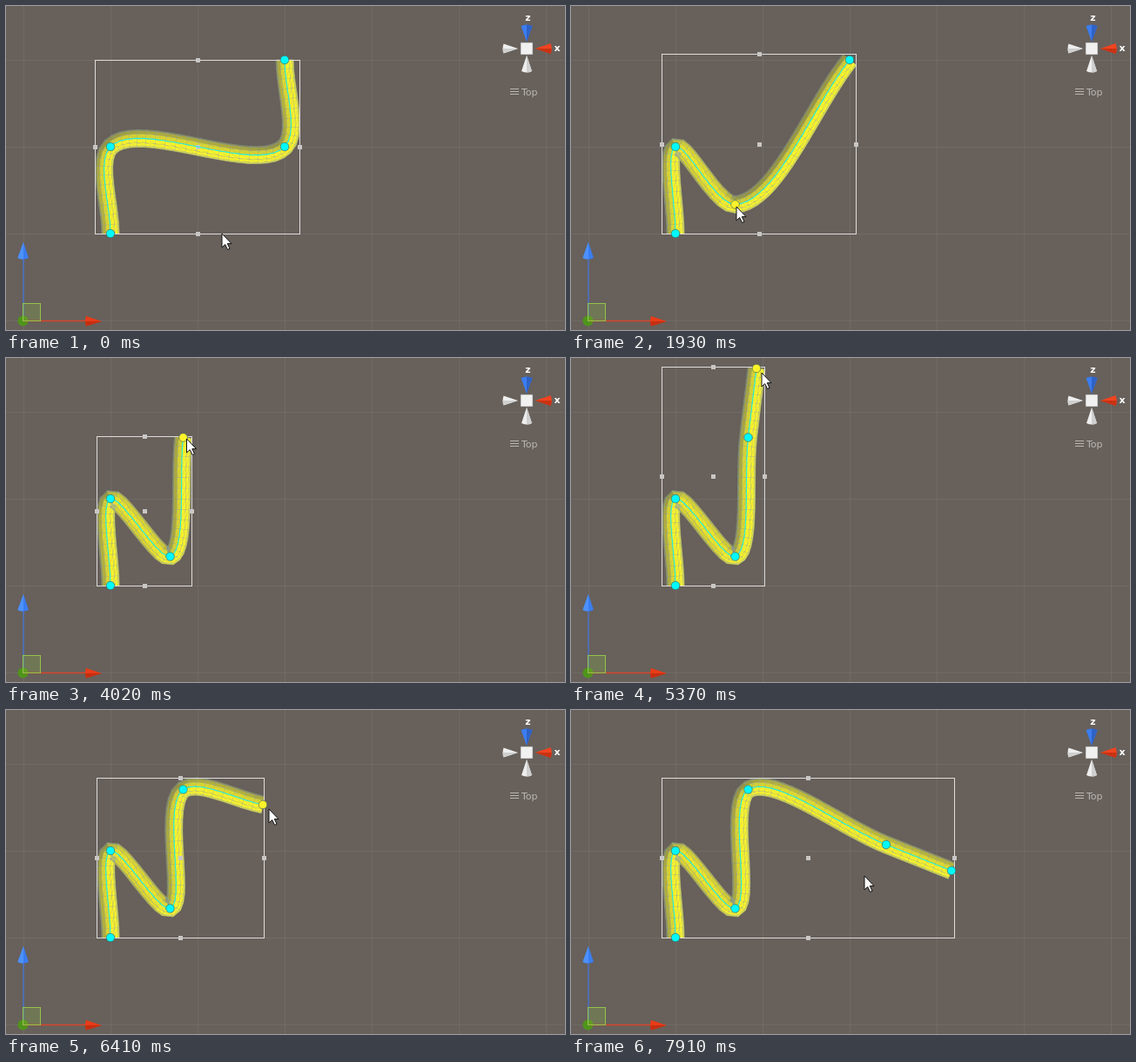
Recreate the animation shown at these times as an HTML page. Size 642 px wide and 373 px high, loop 8000 ms.

```html
<!DOCTYPE html>
<html lang="en">
<head>
<meta charset="utf-8">
<title>Spline editor</title>
<style>
html, body { margin: 0; width: 100%; height: 100%; overflow: hidden; background: #67605b; }
svg { display: block; }
text { font-family: "DejaVu Sans", sans-serif; }
</style>
</head>
<body>
<svg width="642" height="373" viewBox="0 0 642 373">
  <rect width="642" height="373" fill="#67605b"/>
  <path id="grid" stroke="#75746f" stroke-opacity=".6" fill="none"/>

  <path d="M20 362V290" stroke="#4a70c8" stroke-width="1.5"/>
  <path d="M20 272L26 290Q20 293 13.500 290Z" fill="#3b7df0"/>
  <path d="M20 272L20 291.500Q16 291.500 13.500 290Z" fill="#4d91ff"/>
  <circle cx="19.500" cy="362.500" r="6" fill="#4f941b"/>
  <path d="M20 362.500H92" stroke="#d8452a" stroke-width="1.500"/>
  <path d="M110 363L92 357Q90 362.500 92 368.500Z" fill="#e83c18"/>
  <path d="M110 363L91 363Q91 366 92 368.500Z" fill="#c52f10"/>
  <rect x="19.500" y="342.500" width="20" height="20" fill="#8fd03c" fill-opacity=".2" stroke="#94c24b"/>

  <path d="M591.500 23Q598 20 604.500 23L598 41Z" fill="#3b7df0"/>
  <path d="M598 21.500Q602 21.500 604.500 23L598 41Z" fill="#2f62c4"/>
  <path d="M625.500 43Q628 49 625.500 55L608 49Z" fill="#f04420"/>
  <path d="M626.700 49Q626.700 52 625.500 55L608 49Z" fill="#c93213"/>
  <path d="M571.500 43.500Q569.500 49 571.500 54.500L588 49Z" fill="#eee"/>
  <path d="M570.500 49Q570.500 52 571.500 54.500L588 49Z" fill="#cfcfcf"/>
  <path d="M592 75Q598 78 604 75L598 57Z" fill="#eee"/>
  <path d="M598 76.500Q602 76.500 604 75L598 57Z" fill="#cfcfcf"/>
  <rect x="591" y="42" width="14" height="14" fill="#f1f1f1" stroke="#777" stroke-width=".6"/>
  <g fill="#fff" font-size="11" font-weight="bold" text-anchor="middle">
    <text x="599.500" y="17">z</text>
    <text x="633" y="52">x</text>
  </g>
  <path d="M579 95.500H589M579 98.500H589M579 101.500H589" stroke="#b9b6b3"/>
  <text x="592" y="103" font-size="11" fill="#bcb9b6">Top</text>

  <g id="scene"></g>
  <path id="cursor" d="M0 0V16L3.700 12.600L6.600 18.500L9 17.300L6.300 11.600H11Z" fill="#fff" stroke="#111" stroke-width="1"/>
</svg>
<script>
const LOOP = 8000, STEP = 148.8, RADIUS = 10, STRIPS = 6;
const scene = document.getElementById('scene');
const cursor = document.getElementById('cursor');

let gridPath = '';
for (let x = 20.5; x < 642; x += 100) gridPath += `M${x} 0V373`;
for (let y = 62.5; y < 373; y += 100) gridPath += `M0 ${y}H642`;
document.getElementById('grid').setAttribute('d', gridPath);

// Each key is [step, x, y].
const tracks = {
  corner: [[9, 320, 162], [13, 188.5, 228.5]],
  top: [[17, 320, 62], [22, 237, 85.5], [24, 215, 89], [25, 203.5, 91.5]],
  tail: [[36, 213, 12], [41, 280, 85], [43, 295, 109], [45, 362, 155]],
  cursor: [[1, 248, 262], [8, 321, 165], [9, 321, 165], [13, 190, 231], [14, 190, 231],
    [16, 322, 64], [17, 322, 64], [22, 237, 90], [24, 217, 91], [25, 206, 93], [26, 206, 93],
    [27, 207.5, 93], [30, 214, 112], [33, 219, 50], [35, 219, 17], [36, 219, 17],
    [41, 287, 90], [43, 302, 114], [45, 368, 160], [46, 368, 160], [53, 337, 191]]
};

function sample(keys, s) {
  const i = keys.findIndex(k => k[0] > s);
  if (i === 0) return keys[0].slice(1);
  if (i < 0) return keys[keys.length - 1].slice(1);
  const [a, b] = [keys[i - 1], keys[i]];
  const u = (s - a[0]) / (b[0] - a[0]);
  return [1, 2].map(k => a[k] + (b[k] - a[k]) * u);
}

function pointsAt(s) {
  const points = [[120, 262], [120, 162], sample(tracks.corner, s), sample(tracks.top, s)];
  if (s >= 30) points.push(sample(tracks.tail, s));
  if (s >= 50) points.push([437, 185]);
  return points;
}

function activeAt(s) {
  if (s >= 9 && s < 15) return 2;
  if (s >= 17 && s < 29) return 3;
  if (s >= 35 && s < 47) return 4;
  return -1;
}

// Hermite spline whose tangents average the neighbouring chord directions.
function buildRings(points) {
  const chords = points.slice(1).map((p, i) => {
    const dx = p[0] - points[i][0], dy = p[1] - points[i][1], len = Math.hypot(dx, dy);
    return { len, dir: [dx / len, dy / len] };
  });
  const tangent = i => {
    const a = (chords[i - 1] || chords[i]).dir, b = (chords[i] || chords[i - 1]).dir;
    return [(a[0] + b[0]) / 2, (a[1] + b[1]) / 2];
  };
  const rings = [];
  chords.forEach(({ len }, i) => {
    const count = Math.max(4, Math.round(len / 10));
    const m0 = tangent(i), m1 = tangent(i + 1);
    for (let j = i ? 1 : 0; j <= count; j++) {
      const t = j / count, t2 = t * t, t3 = t2 * t;
      const pos = [], vel = [];
      for (const k of [0, 1]) {
        const a = points[i][k], b = points[i + 1][k], u = m0[k] * len, v = m1[k] * len;
        pos[k] = a + (b - a) * (3 * t2 - 2 * t3) + u * (t3 - 2 * t2 + t) + v * (t3 - t2);
        vel[k] = (b - a) * 6 * (t - t2) + u * (3 * t2 - 4 * t + 1) + v * (3 * t2 - 2 * t);
      }
      const speed = Math.hypot(...vel);
      rings.push({ pos, normal: [-vel[1] / speed, vel[0] / speed] });
    }
  });
  return rings;
}

const fmt = p => p.map(v => v.toFixed(1)).join(' ');
const angle = k => (k / STRIPS - .5) * Math.PI;
const onRing = (ring, k) => ring.pos.map((v, c) => v + ring.normal[c] * RADIUS * Math.sin(angle(k)));

function shade(ring, k) {
  const a = angle(k + .5), [nx, ny] = ring.normal;
  const light = .48 * Math.cos(a) + Math.sin(a) * (nx * .5 + ny * .6) + .4;
  const u = Math.min(1, Math.max(0, light));
  return `rgb(${[[128, 255], [124, 246], [58, 36]].map(([d, b]) => Math.round(d + (b - d) * u))})`;
}

function drawTube(rings) {
  let faces = '', wire = '';
  for (let i = 1; i < rings.length; i++) {
    const a = rings[i - 1], b = rings[i];
    for (let k = 0; k < STRIPS; k++) {
      const [p, q, r, s] = [onRing(a, k), onRing(b, k), onRing(b, k + 1), onRing(a, k + 1)].map(fmt);
      const color = shade(b, k);
      faces += `<path d="M${p}L${q}L${r}L${s}Z" fill="${color}" stroke="${color}"/>`;
      wire += `M${q}L${p}L${r}`;
    }
    wire += `M${fmt(onRing(a, STRIPS))}L${fmt(onRing(b, STRIPS))}M${fmt(onRing(b, 0))}L${fmt(onRing(b, STRIPS))}`;
  }
  return `<g stroke-width=".4">${faces}</g>` +
    `<path d="${wire}" fill="none" stroke="#86a2b8" stroke-opacity=".5" stroke-width=".6"/>`;
}

function drawBox(rings) {
  const corners = rings.flatMap(r => [onRing(r, 0), onRing(r, STRIPS)]);
  const snap = v => Math.floor(v + .01) + .5;
  const range = c => {
    const values = corners.map(p => p[c]);
    return [snap(Math.min(...values)), snap(Math.max(...values))];
  };
  const [x0, x1] = range(0), [y0, y1] = range(1);
  const mx = snap((x0 + x1) / 2), my = snap((y0 + y1) / 2);
  const handles = [[mx, y0], [mx, y1], [x0, my], [x1, my], [mx, my]]
    .map(([x, y]) => `<rect x="${x - 2.5}" y="${y - 2.5}" width="5" height="5"/>`).join('');
  return `<rect x="${x0}" y="${y0}" width="${x1 - x0}" height="${y1 - y0}" fill="none" stroke="#dedcdb"/>` +
    `<g fill="#c9c7c5">${handles}</g>`;
}

function drawDots(points, active) {
  return points.map(([x, y], i) =>
    `<circle cx="${x}" cy="${y}" r="4.8" fill="${i === active ? '#fff32a' : '#00fafa'}" ` +
    `stroke="#3c5a50" stroke-width=".6"/>`).join('');
}

function render(s) {
  const points = pointsAt(s), rings = buildRings(points);
  const spine = 'M' + rings.map(r => fmt(r.pos)).join('L');
  scene.innerHTML = drawTube(rings) + drawBox(rings) +
    `<path d="${spine}" fill="none" stroke="#1ff0e0" stroke-width="1.1"/>` +
    drawDots(points, activeAt(s));
  cursor.setAttribute('transform', `translate(${fmt(sample(tracks.cursor, s))})`);
}

let shown = -1;
const start = performance.now();
function tick() {
  const s = Math.floor(((performance.now() - start) % LOOP + 12) / STEP);
  if (s !== shown) render(shown = s);
  requestAnimationFrame(tick);
}
tick();
</script>
</body>
</html>
```
